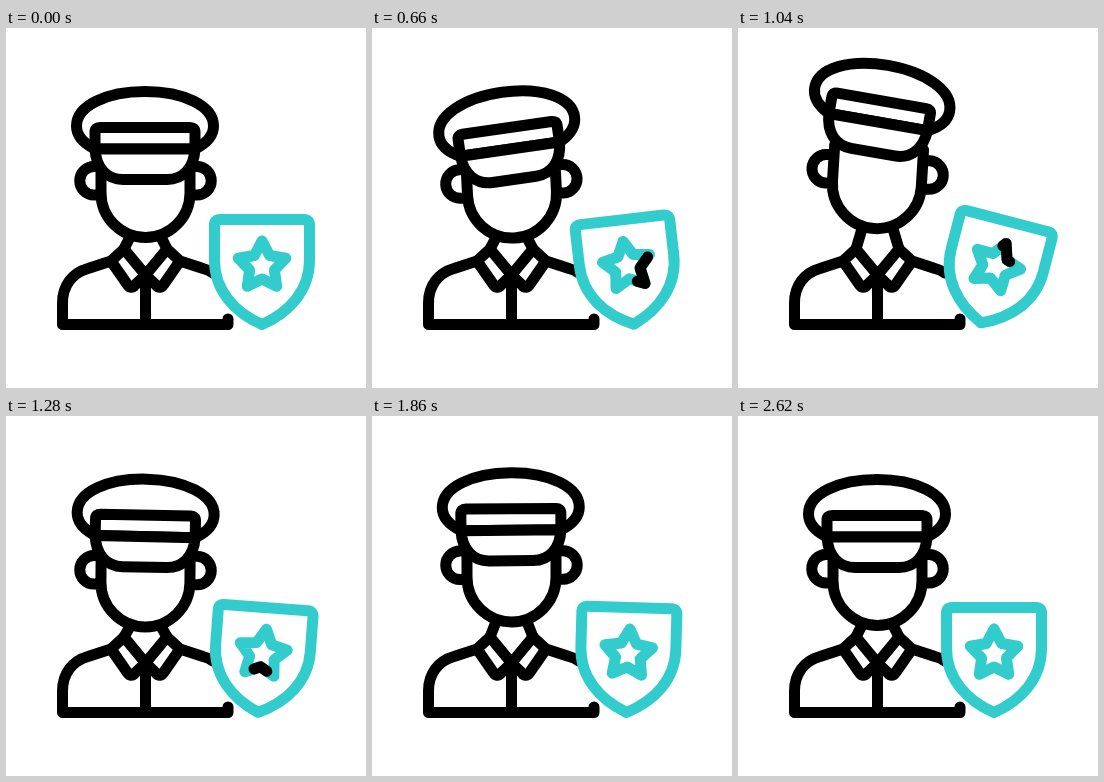
An HTML page with a canvas for the animation above (3600 ms loop, 360x360 px).

```html
<!DOCTYPE html>
<html lang="en">
<head>
<meta charset="utf-8">
<title>Officer with shield</title>
<style>
  html, body { margin: 0; width: 100%; height: 100%; overflow: hidden; background: #fff; }
  canvas { display: block; width: 360px; height: 360px; }
</style>
</head>
<body>
<canvas id="stage" width="360" height="360"></canvas>
<script>
const ctx = document.getElementById('stage').getContext('2d');
const LOOP = 3600, BLACK = '#000', TEAL = '#33cccc';

// Keys are [time, value] pairs, eased in and out.
const tracks = {
  hatY: [[0, 0], [480, 14], [960, -30], [1440, 10], [1920, -7.5], [2400, 0]],
  hatTurn: [[0, 0], [540, -11], [1060, 10], [1540, -10], [2080, 5], [2620, 0]],
  headY: [[0, 0], [480, 5.5], [960, -10], [1440, 5.5], [1920, -4], [2400, 0]],
  shieldTurn: [[0, 0], [460, -14.5], [1040, 14.5], [1560, -8.5], [2080, 8], [2620, 0]],
  starTurn: [[0, 0], [460, -8], [1040, 10], [1560, -2], [2080, 5], [2620, 0]]
};

const bodyPath = new Path2D(`
  M105 233 L82 240.5 C66 245 56.5 258 56.5 275 V296.5 H222 V291
  M174 233 L197 240.5 Q203 242 207 245
  M139.5 247 V296
  M139.5 247 L118 221 L105 233 L121 256 Q125 262 129 257 Z
  M139.5 247 L161 221 L174 233 L158 256 Q154 262 150 257 Z`);
const headPath = new Path2D(`
  M95 128 V165 A44.5 44.5 0 0 0 184 165 V128
  M92 138.5 H88 A14.25 14.25 0 0 0 88 167 H94
  M187 138.5 H191 A14.25 14.25 0 0 1 191 167 H185`);
const crownPath = new Path2D(`M89 121 C75 114 70.5 106 70.5 98
  C70.5 78 100 63.5 139 63.5 S207.5 78 207.5 98 C207.5 106 203 114 189 121 Z`);
const visorPath = new Path2D(`M89 121 C90 140 101 151.5 117 151.5
  H161 C177 151.5 188 140 189 121 Z`);
const bandPath = new Path2D('M89 121 V104 Q89 99.5 94 99.5 H184 Q189 99.5 189 104 V121');
const shieldPath = new Path2D(`M214 191.5 H298 Q303.5 191.5 303.5 197 V232
  C303.5 262 284 284 256 296.5 C228 284 208.5 262 208.5 232 V197 Q208.5 191.5 214 191.5 Z`);

const clamp = x => Math.min(1, Math.max(0, x));
const ramp = (t, from, to) => clamp((t - from) / (to - from));

function valueAt(keys, t) {
  const next = keys.findIndex(key => key[0] > t);
  if (next < 0) return keys[keys.length - 1][1];
  const [t0, v0] = keys[next - 1], [t1, v1] = keys[next];
  const p = ramp(t, t0, t1);
  return v0 + (v1 - v0) * p * p * (3 - 2 * p);
}

function turned(degrees, x, y, draw) {
  ctx.save();
  ctx.translate(x, y);
  ctx.rotate(degrees * Math.PI / 180);
  ctx.translate(-x, -y);
  draw();
  ctx.restore();
}

function filled(path) {
  ctx.fill(path);
  ctx.stroke(path);
}

function starPoint(i) {
  const angle = (i * 36 - 90) * Math.PI / 180;
  const radius = i % 2 ? 13 : 25;
  return [256 + radius * Math.cos(angle), 238 + radius * Math.sin(angle)];
}

function pointAlongStar(s) {
  const i = Math.floor(s), f = s - i;
  const a = starPoint(i), b = starPoint(i + 1);
  return [a[0] + (b[0] - a[0]) * f, a[1] + (b[1] - a[1]) * f];
}

function strokeStar(from, to) {
  ctx.beginPath();
  ctx.moveTo(...pointAlongStar(from));
  for (let i = Math.floor(from) + 1; i < to; i++) ctx.lineTo(...starPoint(i));
  ctx.lineTo(...pointAlongStar(to));
  ctx.stroke();
}

function drawOfficer(pose) {
  ctx.strokeStyle = BLACK;
  ctx.stroke(bodyPath);
  const neckTop = 208 + pose.headY;
  ctx.stroke(new Path2D(`M124.5 ${neckTop} L118 221 M154.5 ${neckTop} L161 221`));

  turned(pose.hatTurn * 0.35, 139.5, 155 + pose.headY, () => {
    ctx.translate(0, pose.headY);
    ctx.stroke(headPath);
  });
  turned(pose.hatTurn, 139, 128 + pose.hatY, () => {
    ctx.translate(0, pose.hatY);
    filled(crownPath);
    filled(visorPath);
    ctx.stroke(bandPath);
  });
}

function drawShield(pose, t) {
  turned(pose.shieldTurn, 256, 245, () => {
    ctx.strokeStyle = TEAL;
    ctx.stroke(shieldPath);
    turned(pose.starTurn, 256, 238, () => {
      strokeStar(0, 10);
      // A dark streak runs twice around the star, its tail catching up.
      const head = 20 * ramp(t, 405, 1540), tail = 20 * ramp(t, 550, 1555);
      if (head > tail) {
        ctx.strokeStyle = BLACK;
        strokeStar(tail, head);
      }
    });
  });
}

function render(now) {
  const t = now % LOOP;
  const pose = {};
  for (const name in tracks) pose[name] = valueAt(tracks[name], t);
  ctx.fillStyle = '#fff';
  ctx.fillRect(0, 0, 360, 360);
  ctx.lineWidth = 11;
  ctx.lineCap = ctx.lineJoin = 'round';
  drawOfficer(pose);
  drawShield(pose, t);
}

let start;
function tick(now) {
  start ??= now;
  render(Math.max(0, now - start));
  requestAnimationFrame(tick);
}
render(0);
requestAnimationFrame(tick);
</script>
</body>
</html>
```
